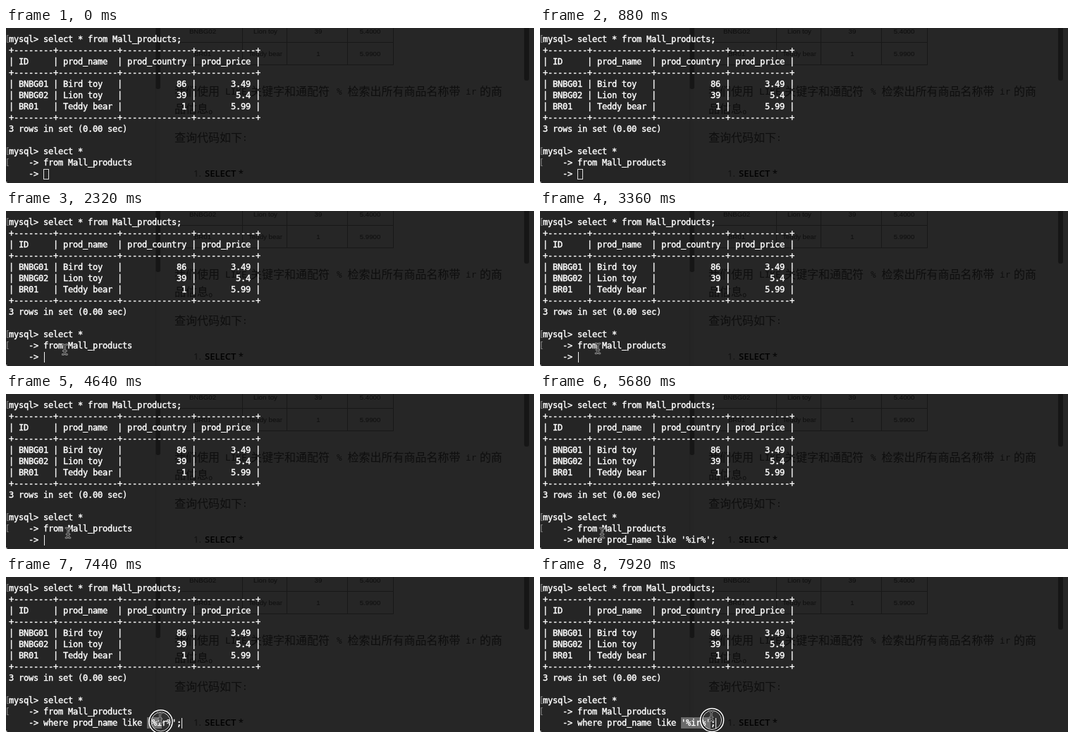
Write an HTML page that moves like this. It is 749 px wide and 221 px high and loops after 8000 ms.

```html
<!DOCTYPE html>
<html lang="zh">
<head>
<meta charset="utf-8">
<title>MySQL LIKE query</title>
<style>
  html, body { margin: 0; width: 100%; height: 100%; overflow: hidden; background: #252525; }
  svg { display: block; }
  text { white-space: pre; }
  #term text { font: 12px "DejaVu Sans Mono", monospace; letter-spacing: -.224px; fill: #fff; stroke: #fff; stroke-width: .4px; }
  #term .mark { fill: #8a8a8a; stroke: none; }
  #page { fill: #0e0e0e; }
  .cell { font: 9.7px "Liberation Sans", sans-serif; text-anchor: middle; }
  .prose { font: 16px "Noto Sans CJK SC", "Noto Sans CJK", sans-serif; }
  .latin { font: 12.7px "DejaVu Sans Mono", monospace; }
  .code { font: 600 13px "Open Sans", sans-serif; fill: #000; }
  .light { font-weight: 400; }
  .num { font: 13px "Open Sans", sans-serif; fill: #101010; }
</style>
</head>
<body>
<svg width="749" height="221" viewBox="0 0 749 221">
  <rect width="749" height="221" fill="#252525"/>
  <rect x="219" width="530" height="221" fill="#262626"/>
  <g id="page">
    <rect x="212" width="1" height="221" fill="#212121"/>
    <rect x="212.500" y="-6" width="6.500" height="93" rx="3" fill="#161616"/>
    <rect x="735" y="-6" width="7" height="81" rx="3" fill="#161616"/>
    <path d="M246 20.500H549.500M246 52.500H549.500M335.500 0V52M398.500 0V52M484.500 0V52M549.500 0V53" stroke="#181818" fill="none"/>
    <text class="code" x="282" y="212">SELECT<tspan class="light"> *</tspan></text>
    <text class="num" x="266" y="212">1.</text>
  </g>
  <rect y="219" width="1.500" height="2" fill="#bbb"/>
  <rect id="selection" x="200" y="200" height="16" fill="#6a6a6a"/>
  <g id="term"></g>
  <rect id="box" x="53.500" y="201.500" width="7" height="14" fill="none" stroke="#ddd"/>
  <rect id="bar" y="201" width="1" height="15" fill="#eee"/>
  <g id="ring" fill="none">
    <circle r="14.800" stroke="#111" stroke-width="2" fill="#fff" fill-opacity=".06"/>
    <circle r="16.500" stroke="#fff" stroke-width="1.500"/>
    <circle r="13.600" stroke="#ddd" stroke-width="1"/>
  </g>
  <path id="arrow" d="M-4.500-7V6L-1.500 3.200L1 8.800L3.400 7.700L1 2.300H5Z" fill="#111" stroke="#fff" stroke-width="1.200"/>
  <g id="beam" fill="none" stroke-linecap="round">
    <path id="stem" d="M-3-7Q0-7 0-4Q0-7 3-7M0-4V4M-3 7Q0 7 0 4Q0 7 3 7M-2 2H2" stroke="#8c8c8c" stroke-width="2.600"/>
    <use href="#stem"/>
    <path d="M-3-7Q0-7 0-4Q0-7 3-7M0-4V4M-3 7Q0 7 0 4Q0 7 3 7M-2 2H2" stroke="#2a2a2a" stroke-width=".9"/>
  </g>
</svg>
<script>
const $ = id => document.getElementById(id);
const LOOP = 8000, PITCH = 16, CHAR = 7, LEFT = 4, BLINK = 560;

function addText(parent, x, y, value, cls) {
  const el = document.createElementNS("http://www.w3.org/2000/svg", "text");
  el.setAttribute("x", x);
  el.setAttribute("y", y);
  if (cls) el.setAttribute("class", cls);
  el.textContent = value;
  $(parent).append(el);
  return el;
}

// web page behind the terminal
[["BNBG02", "Lion toy", "39", "5.4000"], ["BR01", "Teddy bear", "1", "5.9900"]].forEach((row, r) =>
  row.forEach((cell, c) => addText("page", [279, 368, 443, 516.5][c], 8 + 32 * r, cell, "cell")));
[[239, 96, "我们使用"], [347, 96, "关键字和通配符"], [484.5, 96, "检索出所有商品名称带"],
 [672, 96, "的商"], [239, 121, "品信息。"], [239, 162, "查询代码如下"]]
  .forEach(p => addText("page", ...p, "prose"));
[[311, 95, "LIKE"], [469, 95, "%"], [652, 95, "ir"], [335, 161, ":"]]
  .forEach(p => addText("page", ...p, "latin"));

// terminal output
const widths = [6, 10, 12, 10];
const rule = "+" + widths.map(w => "-".repeat(w + 2) + "+").join("");
const record = cells => "|" + cells.map((s, i) =>
  " " + (i > 1 ? s.padStart(widths[i]) : s.padEnd(widths[i])) + " |").join("");
const lines = [
  "mysql> select * from Mall_products;",
  rule,
  record(["ID", "prod_name", "prod_country", "prod_price"]),
  rule,
  record(["BNBG01", "Bird toy", "86", "3.49"]),
  record(["BNBG02", "Lion toy", "39", "5.4"]),
  record(["BR01", "Teddy bear", "1", "5.99"]),
  rule,
  "3 rows in set (0.00 sec)",
  "",
  "mysql> select *",
  "    -> from Mall_products",
  "    -> "
];
const baseline = row => 20 + PITCH * row;
lines.forEach((s, row) => addText("term", LEFT, baseline(row), s));
[0, 10, 11].forEach(row => addText("term", -1.5, baseline(row), "[", "mark"));
const query = "where prod_name like '%ir%';";
const typed = addText("term", LEFT + 7 * CHAR, baseline(12), "");

// pointer path: time, x, y
const path = [
  [800, 150, 232], [1440, 93, 208], [1760, 93, 208], [2480, 82, 196], [3360, 82, 196],
  [4080, 88, 198], [6240, 88, 198], [6480, 190, 201], [6720, 196, 201], [6880, 200, 201],
  [7120, 201, 202], [7840, 243, 198], [8000, 243, 198]
];

function pointerAt(t) {
  const i = path.findIndex(p => p[0] > t);
  if (i < 1) return path[0].slice(1);
  const [t0, x0, y0] = path[i - 1], [t1, x1, y1] = path[i];
  const k = (t - t0) / (t1 - t0), e = k * k * (3 - 2 * k);
  return [x0 + (x1 - x0) * e, y0 + (y1 - y0) * e];
}

const show = (id, on) => $(id).setAttribute("visibility", on ? "visible" : "hidden");
const move = (id, x, y) => $(id).setAttribute("transform", `translate(${x} ${y})`);

function draw(time) {
  const t = Math.floor(time % LOOP / 80) * 80;
  const [x, y] = pointerAt(t);
  const focused = t >= 1680, pasted = t >= 5120, dragging = t >= 7040;
  const arrow = t < 1760;

  show("arrow", arrow && t >= 800);
  show("beam", !arrow);
  move("arrow", x, y);
  move("beam", x, y);
  show("ring", (t >= 1520 && t < 1760) || dragging);
  move("ring", x + (dragging ? 1 : 0), y + (dragging ? 6 : 0));

  typed.textContent = pasted ? query : "";
  show("box", !focused);
  const since = pasted ? t - 5120 : t;
  show("bar", focused && (since % (2 * BLINK) < BLINK || t >= 7360));
  $("bar").setAttribute("x", pasted ? 249 : 54);

  const cells = Math.max(0, Math.min(6, Math.round((x - 200) / CHAR)));
  $("selection").setAttribute("width", dragging ? cells * CHAR : 0);
}

const start = performance.now();
function tick() {
  draw(performance.now() - start);
  requestAnimationFrame(tick);
}
tick();
</script>
</body>
</html>
```
